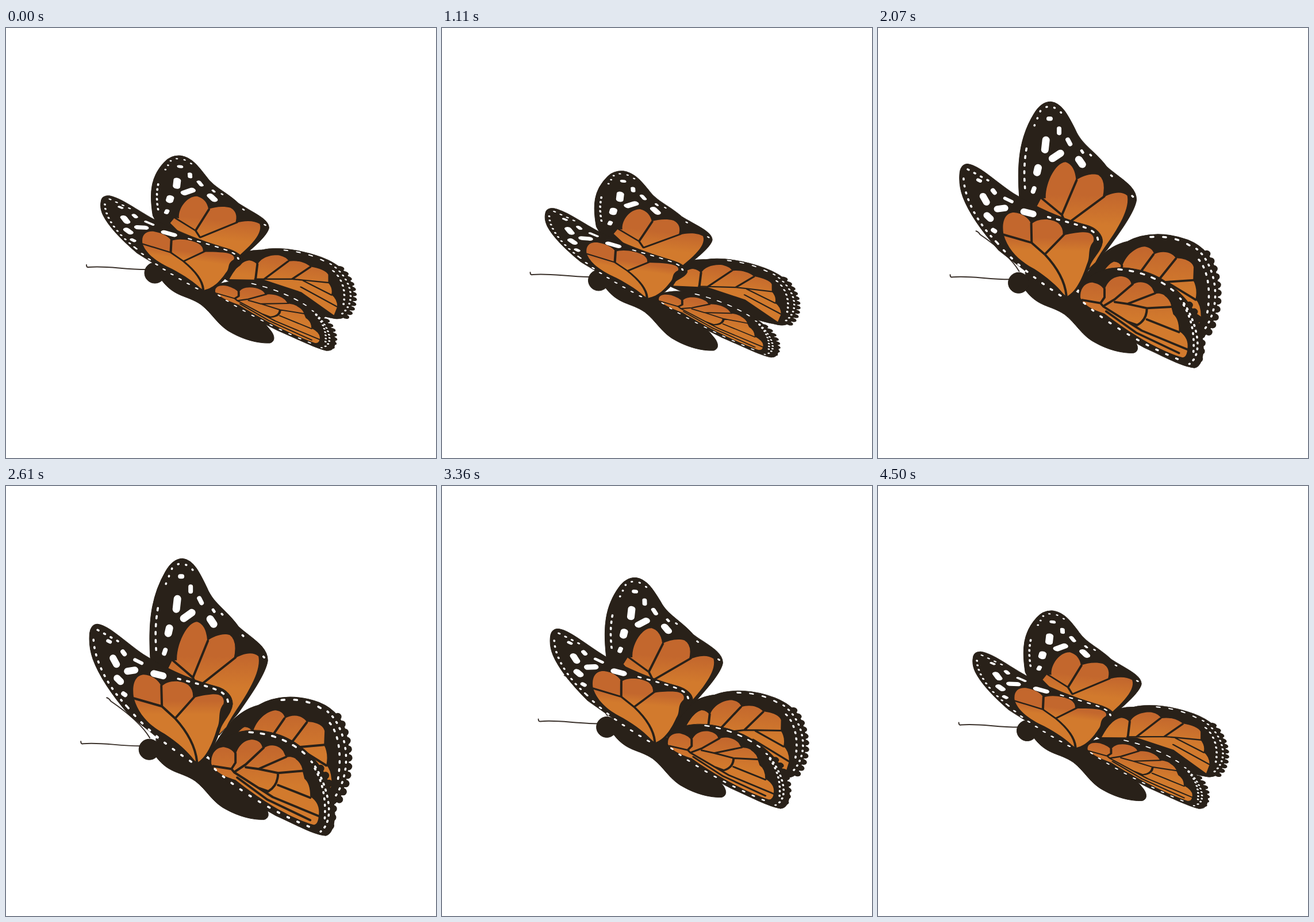
These frames come from a looping animation (748 by 748 pixels, 4530 ms). An HTML page:

```html
<!DOCTYPE html>
<html lang="en">
<head>
<meta charset="utf-8">
<title>Butterfly</title>
<style>
  html, body { margin: 0; width: 100%; height: 100%; overflow: hidden; background: #fff; }
  svg { display: block; width: 100vw; height: 100vh; }
  path { stroke-linecap: round; stroke-linejoin: round; }
  .dark { fill: #292119; stroke: #292119; }
  .vein { fill: none; stroke: #292119; stroke-width: 4; }
  .scallop { fill: none; stroke: #292119; stroke-width: 13; stroke-dasharray: 0 15; }
  .rim, .spot { fill: none; stroke: #fff; }
  .rim { stroke-width: 3.6; }
  .feeler { fill: none; stroke: #3b322c; stroke-width: 2; }
</style>
</head>
<body>
<svg viewBox="0 0 748 748">
  <defs id="defs"></defs>
  <g id="butterfly"></g>
</svg>
<script>
const LOOP = 4530, STEP = 30, STEPS = LOOP / STEP;
const HEAD = { x: 250, y: 457 };
const root = document.getElementById('butterfly');
const defs = document.getElementById('defs');

// drop: how far a point sinks in a full fold, as x, y and constant weights.
// lean: sideways drift per unit of drop; narrow: share of the width lost.
// rims and spots: dash pattern or stroke width -> path.
const wings = {
  rearHind: {
    drop: [.15, -.42, -24], lean: -.1, narrow: 0, shade: [395, 465],
    outline: 'M352 468C375 430 395 392 440 380C470 362 510 362 545 375C575 387 590 410 594 435C600 460 597 500 588 525C583 545 572 556 560 555C510 555 430 520 375 490Z',
    scallop: 'M578 400C604 440 602 510 580 545',
    patch: 'M378 484C388 455 400 425 416 418Q426 418 430 428C436 405 455 390 470 389Q484 391 486 403C498 396 515 396 524 409C540 409 553 415 555 425L554 449Q562 465 558 484Q568 495 567 518L560 545L505 490L440 470Z',
    veins: 'M400 484L424 478L430 425M440 468L485 403M424 472L490 455L524 410M490 455L510 453L555 449M510 455L558 485M505 475L567 518',
    rims: { '5 17': 'M480 371Q520 367 548 385', '2 10': 'M560 391C590 415 610 490 570 544', '3 11': 'M564 411C580 430 586 470 577 516' },
    spots: {}
  },
  rearFore: {
    drop: [.1, -.38, -3.5], lean: -.1, narrow: 0, shade: [295, 350],
    outline: 'M252 302C248 240 252 193 278 148C286 134 296 125 308 125C327 127 338 150 350 175C362 205 385 214 405 243C425 262 457 277 456 303C453 325 425 365 404 395L372 432L290 380L262 335Z',
    patch: 'M282 318L290 302H298C297 275 315 236 333 235Q349 240 351 268C362 260 378 254 390 258Q404 268 397 300C412 290 430 286 440 295C443 310 436 330 425 350C412 375 395 395 384 418L372 430L300 345Z',
    veins: 'M291 302L326 332L352 268M326 332L333 350L400 297',
    rims: { '4 10': 'M265 211C261 235 260 255 262 284', '1 13': 'M279 169L290 141Q307 125 326 145', '2 50': 'M376 221L408 254L453 300' },
    spots: {
      13: 'M299 195L297 213M310 229L324 219M356 230L362 239M285 246L283 255',
      8: 'M322 174V182M337 194L341 202M278 284L276 290M304 156H307', 5: 'M361 214L363 217'
    }
  },
  frontHind: {
    drop: [.2, -.5, -1], lean: 0, narrow: .028, shade: [455, 520],
    outline: 'M355 480C355 470 358 455 372 445C392 425 425 420 455 426C490 432 515 450 535 472C555 492 566 520 570 545C576 572 572 603 557 607C535 605 510 590 470 572C430 550 390 520 365 495Z',
    scallop: 'M548 490C572 518 576 570 562 598',
    patch: 'M358 482C357 462 368 453 380 453Q396 456 400 468C404 450 416 440 430 440Q446 442 447 456C460 446 475 449 483 460L488 471C495 468 505 472 505 474Q516 482 517 496L520 508Q530 516 530 539Q547 550 545 570Q544 588 536 588C500 578 450 550 400 510Q365 500 358 482Z',
    veins: 'M361 486L393 491L400 480V464M393 491L398 497L465 540L545 573M400 495L418 483L449 454M418 488L440 491L488 470M440 491L474 498L520 494M474 498Q474 520 457 530L440 524M474 519L530 541M403 506L455 544L530 580',
    rims: { '6 14': 'M424 427Q480 430 520 464', '2 9': 'M532 478C552 500 580 575 548 600M538 490C552 515 558 545 555 580', '3 16': 'M364 491C400 525 470 570 540 596' },
    spots: {}
  },
  frontFore: {
    drop: [.14, -.42, 5], lean: .14, narrow: 0, shade: [372, 396],
    outline: 'M146 260C146 246 152 239 160 239C180 241 210 272 240 292C285 320 330 338 365 347C385 352 395 365 395 378C393 395 380 405 374 420C368 440 360 460 345 475Q338 483 328 480C315 478 300 468 285 455C265 435 240 418 215 397C190 368 165 335 152 300Q145 280 146 260Z',
    patch: 'M223 367C219 340 228 327 241 327C256 328 268 338 271 348C282 336 305 336 318 345Q327 353 326 368C336 364 350 362 360 361C375 360 382 367 379 378C368 392 375 405 368 420C362 440 352 468 335 479Q331 479 327 474C318 462 300 445 277 430C255 418 232 400 223 367Z',
    veins: 'M223 368L272 382L295 403C315 425 330 450 333 478M272 382L271 346M295 403L328 366',
    rims: { '2 11': 'M153 266C155 300 175 345 212 383M160 249L198 270', '3 15': 'M212 383C240 418 280 450 324 479', '4 12': 'M300 334C335 343 360 349 373 356Q390 365 387 386' },
    spots: {
      12: 'M187 298L193 309M212 321L225 319M194 333L200 339M258 325L274 329',
      8: 'M204 287L207 291M205 360L208 362', 6: 'M178 268L182 270M225 301L237 307'
    }
  }
};

function add(parent, tag, attrs) {
  const node = document.createElementNS('http://www.w3.org/2000/svg', tag);
  for (const key in attrs) node.setAttribute(key, attrs[key]);
  return parent.appendChild(node);
}

const centred = parent => add(parent, 'g', { transform: `translate(${-HEAD.x} ${-HEAD.y})` });

function addWing(name) {
  const wing = wings[name];
  const [y1, y2] = wing.shade;
  const gradient = add(defs, 'linearGradient', { id: name, gradientUnits: 'userSpaceOnUse', x1: 0, x2: 0, y1, y2 });
  add(gradient, 'stop', { offset: 0, 'stop-color': '#c3672d' });
  add(gradient, 'stop', { offset: 1, 'stop-color': '#d27a2d' });

  wing.node = add(root, 'g');
  const art = centred(wing.node);
  add(art, 'path', { class: 'dark', d: wing.outline });
  if (wing.scallop) add(art, 'path', { class: 'scallop', d: wing.scallop });
  add(art, 'path', { d: wing.patch, fill: `url(#${name})` });
  add(art, 'path', { class: 'vein', d: wing.veins });
  for (const dash in wing.rims) add(art, 'path', { class: 'rim', d: wing.rims[dash], 'stroke-dasharray': dash });
  for (const width in wing.spots) add(art, 'path', { class: 'spot', d: wing.spots[width], 'stroke-width': width });
}

function addBody() {
  const body = centred(root);
  add(body, 'path', { class: 'feeler', d: 'M131 443Q131 448 135 447C165 444 195 451 235 451' });
  add(body, 'path', { class: 'feeler', d: 'M176 367Q180 368 183 373C205 388 235 410 251 437' });
  add(body, 'path', { class: 'dark', d: 'M262 470C285 500 305 495 330 512C350 527 360 550 385 562C405 573 430 580 450 579C460 576 458 566 452 558C430 530 400 505 370 485L345 470L262 438Z' });
  add(body, 'circle', { class: 'dark', cx: HEAD.x, cy: HEAD.y, r: 18 });
}

addWing('rearHind');
addWing('rearFore');
addBody();
addWing('frontHind');
addWing('frontFore');

// Head positions at equal intervals round the loop.
const driftX = [259, 264, 273, 272, 255, 244, 247, 250, 268, 288, 292, 274];
const driftY = [426, 429, 438, 439, 439, 440, 448, 458, 437, 418, 411, 418];

// Wing beat angle in degrees by step: about 19 a step, then a slow glide.
const beat = [[0, 128], [23, 572], [51, 1148], [87, 1838], [112, 2250], [123, 2520], [134, 2587], [STEPS, 2648]];

// Closed Catmull-Rom curve; phase runs from 0 to 1.
function loopCurve(values, phase) {
  const n = values.length, i = Math.floor(phase * n), p = phase * n - i;
  const [a, b, c, d] = [-1, 0, 1, 2].map(k => values[(i + k + n) % n]);
  return b + p / 2 * (c - a + p * (2 * a - 5 * b + 4 * c - d + p * (3 * (b - c) + d - a)));
}

function beatAngle(step) {
  const i = beat.findIndex(([at]) => at > step);
  const [a, u] = beat[i - 1], [b, v] = beat[i];
  return u + (v - u) * (step - a) / (b - a);
}

function draw(time) {
  const step = Math.floor(time % LOOP / STEP), phase = step / STEPS;
  root.setAttribute('transform', `translate(${loopCurve(driftX, phase)} ${loopCurve(driftY, phase)})`);
  const fold = .56 - .71 * Math.cos(beatAngle(step) * Math.PI / 180);
  for (const { node, drop, lean, narrow } of Object.values(wings)) {
    const [x, y, c] = drop.map(weight => weight * fold);
    node.setAttribute('transform',
      `matrix(${1 + lean * x - narrow * fold} ${x} ${lean * y} ${1 + y} ${lean * c} ${c})`);
  }
}

const start = performance.now();
function tick() {
  draw(performance.now() - start);
  requestAnimationFrame(tick);
}
tick();
</script>
</body>
</html>
```
